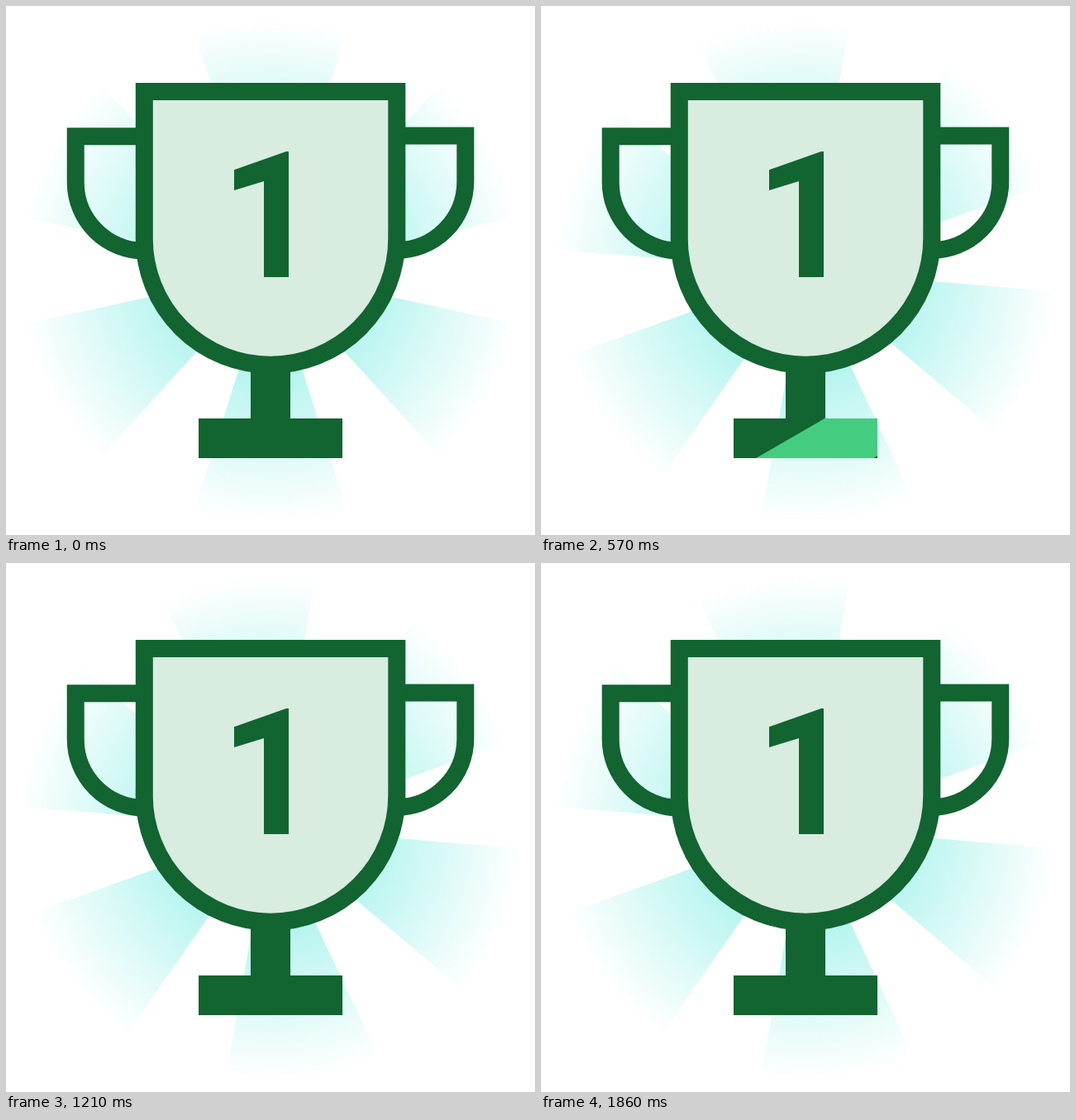
Write an HTML page with a canvas that moves like this. It is 640 by 640 pixels and loops after 1930 ms.

```html
<!DOCTYPE html>
<html lang="en">
<head>
<meta charset="utf-8">
<title>First place trophy</title>
<style>
  html, body { margin: 0; width: 100%; height: 100%; overflow: hidden; background: #fff; }
  canvas { display: block; width: 640px; height: 640px; }
</style>
</head>
<body>
<canvas id="stage" role="img" aria-label="Trophy with the number 1"></canvas>
<script>
const SIZE = 640, C = SIZE / 2, RAD = Math.PI / 180;
const LOOP = 1930, FPS = 14, CLIP_FPS = 25;
const DARK = { line: '#126430', fill: '#d8ece0' };
const LIGHT = { line: '#44cd81', fill: '#def7ea' };
const LINE = 21;
const SLOPE = Math.tan(30 * RAD), BAND = 82, SPEED = 44.6;

const canvas = document.getElementById('stage');
const ctx = canvas.getContext('2d');
const ratio = window.devicePixelRatio || 1;
canvas.width = canvas.height = SIZE * ratio;
ctx.scale(ratio, ratio);

const glow = ctx.createRadialGradient(C, C, 0, C, C, 304);
glow.addColorStop(0, 'rgba(131, 237, 228, 1)');
glow.addColorStop(1, 'rgba(131, 237, 228, 0)');

const cup = new Path2D();
cup.moveTo(167.3, 281.5);
cup.lineTo(167.3, 103.5);
cup.lineTo(472.8, 103.5);
cup.lineTo(472.8, 281.5);
cup.arc(C, 281.5, 152.75, 0, Math.PI);
cup.closePath();

// side is -1 for left, 1 for right
function makeHandle(side, top) {
  const x = C + side * 152.9, r = 82.9, y = top + 55.4;
  const p = new Path2D();
  p.moveTo(x, top);
  p.lineTo(x + side * r, top);
  p.lineTo(x + side * r, y);
  p.arc(x, y, r, side > 0 ? 0 : Math.PI, Math.PI / 2, side < 0);
  return p;
}
const handles = [makeHandle(-1, 157.8), makeHandle(1, 157.1)];

const one = new Path2D(
  'M342 176 H339 L276 198.3 V223 L312 212 V328 H342 Z');

function drawRays(angle) {
  const half = 17.7 * RAD;
  ctx.fillStyle = glow;
  for (let i = 0; i < 6; i++) {
    const mid = (angle + 30 + i * 60) * RAD;
    ctx.beginPath();
    ctx.moveTo(C, C);
    ctx.arc(C, C, 304, mid - half, mid + half);
    ctx.fill();
  }
}

function drawTrophy(colors) {
  ctx.lineWidth = LINE;
  ctx.strokeStyle = colors.line;
  handles.forEach(h => ctx.stroke(h));
  ctx.fillStyle = colors.fill;
  ctx.fill(cup);
  ctx.stroke(cup);
  ctx.fillStyle = colors.line;
  ctx.fillRect(296, 438, 48, 62);
  ctx.fillRect(233, 499, 174, 48);
}

function drawOne(colors) {
  ctx.fillStyle = colors.line;
  ctx.fill(one);
}

// Runs draw inside a slanted band; top is its upper edge on the centre line
function inBand(top, draw) {
  const rise = C * SLOPE;
  ctx.save();
  ctx.beginPath();
  ctx.moveTo(0, top + rise);
  ctx.lineTo(SIZE, top - rise);
  ctx.lineTo(SIZE, top - rise + BAND);
  ctx.lineTo(0, top + rise + BAND);
  ctx.clip();
  draw(LIGHT);
  ctx.restore();
}

// Steps of 14 per second, each showing the nearest pose of a 25 fps clip
function poseAt(ms) {
  const t = ms % LOOP;
  let k = Math.floor(t * FPS / 1000) + 1;
  while (k > 0 && Math.round(k * 100 / FPS) * 10 > t + 0.01) k--;
  return Math.floor((Math.min(k, 26) + 0.5) * CLIP_FPS / FPS);
}

function draw(n) {
  ctx.fillStyle = '#fff';
  ctx.fillRect(0, 0, SIZE, SIZE);
  drawRays(n * 7.5);
  drawTrophy(DARK);
  inBand(-156.6 + SPEED * n, drawTrophy);
  drawOne(DARK);
  inBand(149.4 + SPEED * (n - 22), drawOne);
}

const start = performance.now();
function tick() {
  draw(poseAt(performance.now() - start));
  requestAnimationFrame(tick);
}
tick();
</script>
</body>
</html>
```
